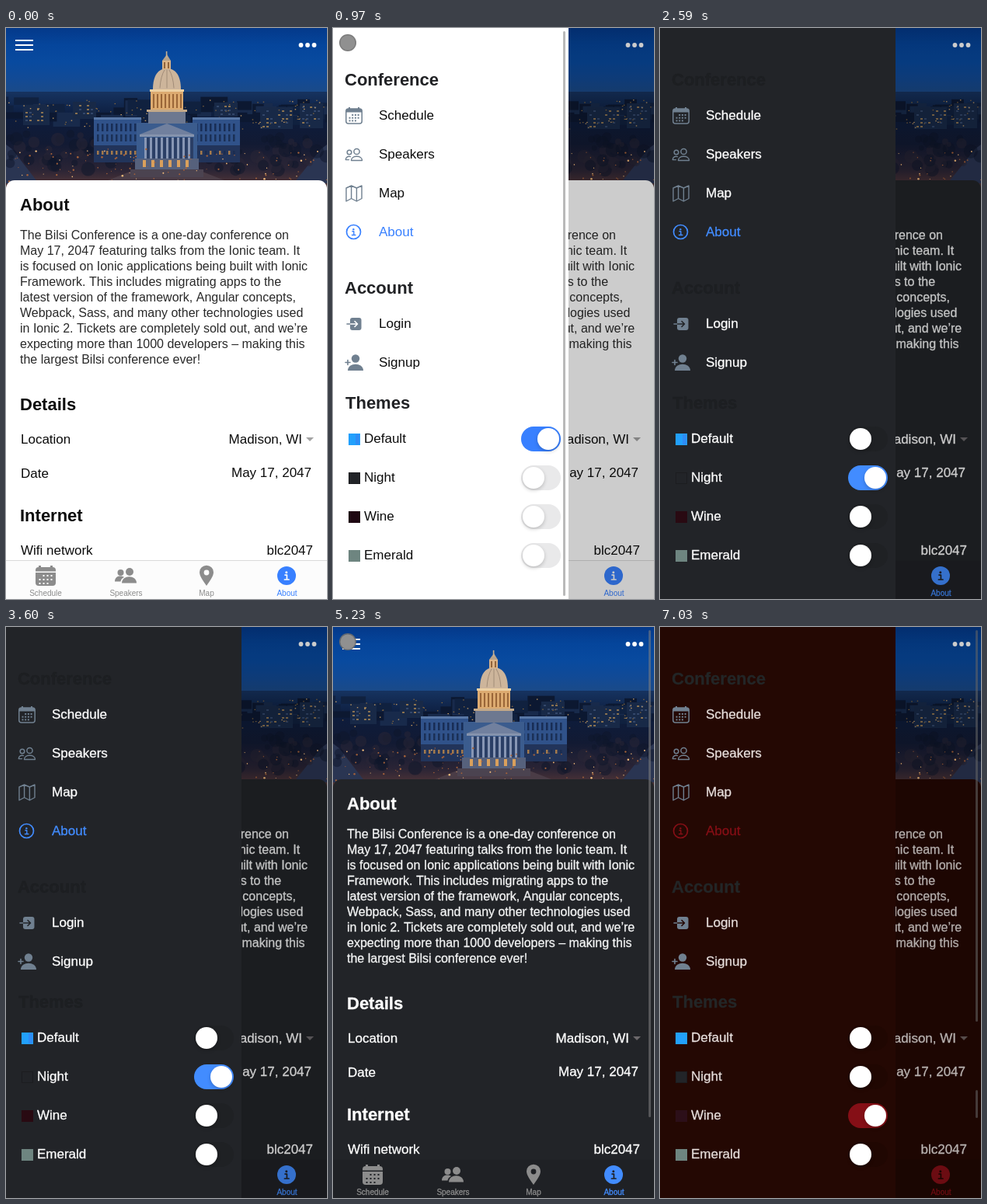
An HTML page with a canvas for the animation above (8000 ms loop, 413 by 735 pixels).

```html
<!DOCTYPE html>
<html lang="en">
<head>
<meta charset="utf-8">
<title>Conference app themes</title>
<style>
html, body { margin: 0; width: 100%; height: 100%; overflow: hidden; background: #fff; }
canvas { display: block; width: 413px; height: 735px; }
</style>
</head>
<body>
<canvas id="stage" width="413" height="735"></canvas>
<script>
const W = 413, H = 735, LOOP = 8000, MENU = 303;
const ctx = document.getElementById('stage').getContext('2d');
const FONT = '"Liberation Sans", Arial, sans-serif';

const THEMES = [
  { bg: '#ffffff', text: '#0c0c0c', body: '#2a2a2a', head: '#212225', accent: '#3880ff', off: '#e9e9ea',
    tab: '#fcfcfc', line: '#dadada', caret: '#a3a3a3', plum: '#1f0812', edge: '#2f8cf6' },
  { bg: '#222428', text: '#ffffff', body: '#f4f5f5', head: '#1d1f22', accent: '#428cff', off: '#1f2124',
    tab: '#1f2125', line: '#212327', caret: '#6c686b', plum: '#290a12', edge: '#2f8cf6' },
  { bg: '#240803', text: '#e6dedc', body: '#e0d8d6', head: '#232627', accent: '#850f16', off: '#200702',
    tab: '#200702', line: '#220702', caret: '#6c5f5e', plum: '#2c0f19', edge: '#22a0fc' }
];
const SLATE = '#708090', GREY = '#8c8c8c', SCROLL = 'rgba(128,128,128,.55)';

const clamp = v => Math.min(1, Math.max(0, v));
const ramp = (t, from, len) => clamp((t - from) / len);
const smooth = v => v * v * (3 - 2 * v);

function bezier(x1, y1, x2, y2) {
  const at = (a, b, s) => 3 * (1 - s) * (1 - s) * s * a + 3 * (1 - s) * s * s * b + s * s * s;
  return x => {
    let lo = 0, hi = 1;
    for (let i = 0; i < 24; i++) {
      const mid = (lo + hi) / 2;
      if (at(x1, x2, mid) < x) lo = mid; else hi = mid;
    }
    return x <= 0 ? 0 : x >= 1 ? 1 : at(y1, y2, lo);
  };
}
const easeOpen = bezier(.32, .72, 0, 1);
const easeClose = bezier(1, 0, .68, .28);

function mix(a, b, k) {
  const part = (c, i) => parseInt(c.slice(i, i + 2), 16);
  return 'rgb(' + [1, 3, 5].map(i => Math.round(part(a, i) + (part(b, i) - part(a, i)) * k)) + ')';
}
function blend(a, b, k) {
  const out = {};
  for (const key in a) out[key] = mix(a[key], b[key], k);
  return out;
}

// ---- drawing helpers ----
let ink = 0; // extra stem weight for light text on dark

// Words are set one by one, so no kerning happens across spaces.
function text(c, s, x, y, size, color, bold, align) {
  c.font = (bold ? 'bold ' : '') + size + 'px ' + FONT;
  c.fillStyle = c.strokeStyle = color;
  c.lineWidth = ink;
  const gap = c.measureText(' ').width;
  const words = s.split(' ').map(w => [w, c.measureText(w).width]);
  const width = words.reduce((sum, w) => sum + w[1] + gap, -gap);
  if (align === 'right') x -= width;
  if (align === 'center') x -= width / 2;
  for (const [w, len] of words) {
    c.fillText(w, x, y);
    if (ink > 0) c.strokeText(w, x, y);
    x += len + gap;
  }
}
function rect(c, x, y, w, h, color) {
  c.fillStyle = color;
  c.fillRect(x, y, w, h);
}
function box(c, x, y, w, h, r, color) {
  c.fillStyle = color;
  c.beginPath();
  c.roundRect(x, y, w, h, r);
  c.fill();
}
function disc(c, x, y, r, color) {
  c.fillStyle = color;
  c.beginPath();
  c.arc(x, y, r, 0, 7);
  c.fill();
}
function poly(c, pts, color) {
  c.fillStyle = color;
  c.beginPath();
  pts.forEach(p => c.lineTo(p[0], p[1]));
  c.fill();
}
function stroke(c, path, color, width) {
  c.strokeStyle = color;
  c.lineWidth = width;
  c.lineCap = c.lineJoin = 'round';
  c.stroke(new Path2D(path));
}
const fillPath = (c, path, color) => { c.fillStyle = color; c.fill(new Path2D(path)); };

// ---- hero picture: simple night skyline ----
const hero = document.createElement('canvas');
hero.width = W;
hero.height = 216;
function paintHero(c) {
  let seed = 11;
  const rnd = (a, b) => {
    seed = (seed * 16807) % 2147483647;
    return a + (b - a) * seed / 2147483647;
  };
  const fade = (y0, y1, stops) => {
    const g = c.createLinearGradient(0, y0, 0, y1);
    stops.forEach((s, i) => g.addColorStop(i / (stops.length - 1), s));
    return g;
  };
  rect(c, 0, 0, W, 86, fade(0, 86, ['#04398a', '#05459b', '#084a9f', '#114a96', '#1d4a85']));
  rect(c, 0, 82, W, 134, fade(82, 216, ['#163360', '#0d1c3c', '#121a33', '#2a2435', '#6a4038']));

  for (let i = 0; i < 46; i++) {
    const x = rnd(-10, W), y = rnd(88, 114), w = rnd(12, 36);
    rect(c, x, y, w, rnd(8, 22), ['#10213f', '#0c1831', '#182a4b'][i % 3]);
  }
  for (const [x, y, w, h] of [[22, 99, 34, 26], [86, 95, 30, 22], [268, 96, 30, 18], [327, 102, 42, 28], [378, 97, 30, 32]]) {
    rect(c, x, y, w, h, '#182947');
    for (let j = y + 4; j < y + h - 3; j += 5)
      for (let i = x + 3; i < x + w - 3; i += 5)
        if (rnd(0, 1) > .5) rect(c, i, j, 3, 2, rnd(0, 1) > .6 ? '#8a7250' : '#33476a');
  }
  for (let i = 0; i < 110; i++)
    rect(c, rnd(0, W), rnd(92, 130), 1.5, 1.2, i % 3 ? '#87693f' : '#d0a468');

  poly(c, [[0, 150], [8, 156], [42, 200], [0, 200]], '#2a3552');
  poly(c, [[413, 150], [405, 156], [370, 200], [413, 200]], '#2a3552');
  poly(c, [[80, 216], [172, 180], [240, 180], [332, 216]], '#4a3c46');

  for (let i = 0; i < 90; i++) {
    const x = i % 2 ? rnd(0, 158) : rnd(256, W);
    c.globalAlpha = .5;
    disc(c, x, rnd(134, 184), rnd(3, 9), i % 3 ? '#0d162a' : '#2a2536');
  }
  c.globalAlpha = 1;

  // wings
  for (const x of [113, 240]) {
    rect(c, x, 117, 61, 37, '#30528a');
    rect(c, x, 115, 61, 3, '#5877a6');
    rect(c, x, 151, 61, 22, '#22345a');
    for (let i = x + 4; i < x + 58; i += 6) {
      rect(c, i, 123, 2.5, 10, '#182d55');
      rect(c, i, 137, 2.5, 9, '#1b3056');
      rect(c, i, 158, 2.5, 5, i % 4 ? '#a47a4c' : '#1b2c50');
    }
  }
  // centre block
  rect(c, 168, 122, 78, 60, '#3b5c8e');
  poly(c, [[172, 137], [207, 123], [242, 137]], '#71809e');
  rect(c, 172, 137, 70, 3, '#8593ad');
  for (let i = 178; i < 240; i += 7) {
    rect(c, i, 141, 3, 27, '#8796b4');
    rect(c, i + 3, 141, 4, 27, '#2b3f66');
  }
  rect(c, 166, 168, 82, 14, '#56617c');
  for (let i = 176; i < 242; i += 11) rect(c, i, 170, 4, 9, '#d9a05c');
  rect(c, 160, 182, 94, 10, '#4b4350');

  // dome
  rect(c, 183, 107, 48, 16, '#6d7890');
  rect(c, 181, 105, 52, 3, '#c4a988');
  rect(c, 186, 80, 42, 25, '#dcaa70');
  for (let i = 189; i < 227; i += 5) rect(c, i, 85, 2, 18, '#9a6638');
  rect(c, 185, 79, 44, 3, '#ecd0a4');
  fillPath(c, 'M189 79C189 61 196 52 207 52S225 61 225 79Z', '#cdb59b');
  stroke(c, 'M198 77Q199 62 204 54M216 77Q215 62 210 54M207 77V54', '#a18c78', 1);
  rect(c, 201, 42, 11, 11, '#dcb488');
  rect(c, 203, 44, 2, 8, '#93653c');
  rect(c, 208, 44, 2, 8, '#93653c');
  poly(c, [[201, 42], [207, 34], [212, 42]], '#b5a28c');
  rect(c, 205.8, 30, 1.6, 8, '#c6b193');

  for (let i = 0; i < 110; i++) {
    const y = rnd(156, 200);
    disc(c, rnd(0, W), y, rnd(.5, 1.3), i % 4 ? '#a5623a' : '#f4bd7c');
  }
}
paintHero(hero.getContext('2d'));

// ---- icons ----
function people(c, x, y, color) {
  disc(c, x + 19, y + 5.5, 5, color);
  fillPath(c, `M${x + 9} ${y + 20}C${x + 9} ${y + 9} ${x + 28} ${y + 9} ${x + 28} ${y + 20}Z`, color);
  disc(c, x + 7.5, y + 6.5, 4, color);
  fillPath(c, `M${x} ${y + 18}C${x} ${y + 10} ${x + 9} ${y + 10} ${x + 12} ${y + 12.5}Q${x + 8} ${y + 14} ${x + 7.5} ${y + 18}Z`, color);
}
function dayDots(c, x, y, step, size, color) {
  for (let r = 0; r < 3; r++)
    for (let i = 0; i < 4; i++)
      if (!(r === 0 && i === 0) && !(r === 2 && i === 3)) rect(c, x + i * step, y + r * step, size, size, color);
}
function letterI(c, x, y, k, color) {
  disc(c, x - .2 * k, y - 4.2 * k, 1.5 * k, color);
  stroke(c, `M${x - 2 * k} ${y - .9 * k}H${x + .4 * k}V${y + 5 * k}M${x - 2.6 * k} ${y + 5 * k}H${x + 3 * k}`, color, 1.7 * k);
}
function tabBar(c, th) {
  rect(c, 0, 685, W, 50, th.tab);
  rect(c, 0, 685, W, 1, th.line);
  box(c, 38, 694, 26, 24, 4, GREY);
  rect(c, 42, 692, 3, 4, GREY);
  rect(c, 57, 692, 3, 4, GREY);
  rect(c, 38, 699.5, 26, 1.5, th.tab);
  dayDots(c, 42.5, 704, 5, 2, th.tab);
  people(c, 140, 694.5, GREY);
  fillPath(c, 'M258 718C254 712 249 706 249 700.5A9 8.7 0 0 1 267 700.5C267 706 262 712 258 718Z', GREY);
  disc(c, 258, 701, 3.4, th.tab);
  disc(c, 361, 705, 12, th.accent);
  letterI(c, 361, 705, 1, th.tab);
  ['Schedule', 'Speakers', 'Map', 'About'].forEach((s, i) =>
    text(c, s, [51, 154.5, 258, 361.5][i], 731, 10, i === 3 ? th.accent : GREY, false, 'center'));
}

// ---- page ----
const COPY = [
  'The Bilsi Conference is a one-day conference on',
  'May 17, 2047 featuring talks from the Ionic team. It',
  'is focused on Ionic applications being built with Ionic',
  'Framework. This includes migrating apps to the',
  'latest version of the framework, Angular concepts,',
  'Webpack, Sass, and many other technologies used',
  'in Ionic 2. Tickets are completely sold out, and we’re',
  'expecting more than 1000 developers – making this',
  'the largest Bilsi conference ever!'
];
function page(c, th, t) {
  rect(c, 0, 0, W, H, th.bg);
  c.drawImage(hero, 0, 0);
  box(c, 0, 196, W, 560, 11, th.bg);
  for (const y of [16, 22, 28]) rect(c, 12, y - 1, 23, 2, '#fff');
  for (const x of [379.5, 388, 396.5]) disc(c, x, 22, 2.9, '#fff');

  text(c, 'About', 18, 235, 22, th.text, true);
  COPY.forEach((s, i) => text(c, s, 18, 272 + 20 * i, 16, th.body));
  text(c, 'Details', 18, 492, 22, th.text, true);
  text(c, 'Location', 19, 535, 17, th.text);
  text(c, 'Madison, WI', 381, 535, 17, th.text, false, 'right');
  poly(c, [[386, 527], [396, 527], [391, 532]], th.caret);
  text(c, 'Date', 19, 579, 17, th.text);
  text(c, 'May 17, 2047', 393, 578, 17, th.text, false, 'right');
  text(c, 'Internet', 18, 635, 22, th.text, true);
  text(c, 'Wifi network', 19, 678, 17, th.text);
  text(c, 'blc2047', 395, 678, 17, th.text, false, 'right');
  tabBar(c, th);

  if (t >= 3900) {
    const split = t >= 5250;
    box(c, 406, 4, 3, split ? 504 : 627, 1.5, SCROLL);
    if (split) box(c, 406, 596, 3, 36, 1.5, SCROLL);
  }
}

// ---- side menu ----
function menuIcons(c, th) {
  c.strokeStyle = SLATE;
  c.lineWidth = 1.5;
  c.beginPath();
  c.roundRect(16.8, 104, 20.4, 19, 3);
  c.stroke();
  rect(c, 17, 104, 20, 4.5, SLATE);
  rect(c, 20, 102, 2, 3, SLATE);
  rect(c, 32, 102, 2, 3, SLATE);
  dayDots(c, 20.5, 111, 3.7, 2, SLATE);

  c.beginPath();
  c.arc(30.5, 159, 3.6, 0, 7);
  c.stroke();
  c.beginPath();
  c.arc(21, 160, 2.8, 0, 7);
  c.stroke();
  stroke(c, 'M23.5 170.5C23.5 163.5 37.5 163.5 37.5 170.5ZM22.5 165.6C19.5 164.6 16.5 166 16.3 169.6H20.5', SLATE, 1.4);
  stroke(c, 'M17 206L23.6 203L30.4 206L37 203V219.5L30.4 223L23.6 219.5L17 223ZM23.6 203V219.5M30.4 206V223', SLATE, 1.4);

  c.strokeStyle = th.accent;
  c.lineWidth = 1.7;
  c.beginPath();
  c.arc(26.5, 262.5, 9, 0, 7);
  c.stroke();
  letterI(c, 26.5, 262.5, .8, th.accent);

  box(c, 22, 373, 14.5, 16, 3, SLATE);
  stroke(c, 'M22 381H31M28 377.5L31.5 381L28 384.5', th.bg, 1.6);
  stroke(c, 'M18 381H21.5', SLATE, 1.6);

  disc(c, 29, 425.5, 5.2, SLATE);
  fillPath(c, 'M19 441C19 430 39 430 39 441Z', SLATE);
  stroke(c, 'M19 427.5V433.5M16 430.5H22', SLATE, 1.6);
}
function toggle(c, y, on, th) {
  box(c, 242, y - 16, 51, 32, 16, th.off);
  c.globalAlpha = on;
  box(c, 242, y - 16, 51, 32, 16, th.accent);
  c.globalAlpha = 1;
  c.save();
  c.shadowColor = 'rgba(0,0,0,.2)';
  c.shadowBlur = 5;
  c.shadowOffsetY = 2;
  disc(c, 258 + 19 * on, y, 14, '#fff');
  c.restore();
}
function menu(c, th, shown, on, barOn) {
  if (shown <= 0) return;
  c.save();
  c.translate(-MENU * (1 - shown), 0);
  rect(c, 0, 0, MENU, H, th.bg);
  text(c, 'Conference', 15, 74, 22, th.head, true);
  text(c, 'Account', 15, 342, 22, th.head, true);
  text(c, 'Themes', 16, 490, 22, th.head, true);
  [['Schedule', 118], ['Speakers', 168], ['Map', 218], ['About', 268], ['Login', 386], ['Signup', 436]]
    .forEach(([s, y]) => text(c, s, 59, y, 17, s === 'About' ? th.accent : th.text));
  menuIcons(c, th);

  const fills = ['#22a0fc', '#222428', th.plum, '#6e8580'];
  ['Default', 'Night', 'Wine', 'Emerald'].forEach((s, i) => {
    const y = 529 + 50 * i;
    rect(c, 20, y - 7, 15, 15, i === 1 ? '#1c1d20' : fills[i]);
    if (i === 1) rect(c, 21, y - 6, 13, 13, fills[i]);
    if (i === 0) rect(c, 29, y - 6, 5, 13, th.edge);
    text(c, s, 40, y + 5, 17, th.text);
    toggle(c, y, on[i], th);
  });
  if (barOn) box(c, 296, 4, 3, 727, 1.5, SCROLL);
  c.restore();
}

// ---- timeline ----
const TOUCHES = [[500, 1130, 19, 19], [2140, 2560, 256.5, 583], [5230, 5630, 19, 19], [6720, 7000, 256.5, 633]];
const NIGHT = 2210, WINE = 6760;

function menuShown(t) {
  if (t < 3590) return easeOpen(ramp(t, 520, 400));
  if (t < 5250) return 1 - easeClose(ramp(t, 3590, 400));
  return easeOpen(ramp(t, 5250, 380));
}
function draw(t) {
  const dark = ramp(t, NIGHT, 200);
  const th = t < WINE
    ? blend(THEMES[0], THEMES[1], dark)
    : blend(THEMES[1], THEMES[2], ramp(t, WINE, 200));
  const a = smooth(ramp(t, NIGHT, 240)), b = smooth(ramp(t, WINE, 240));
  const shown = menuShown(t);
  ink = .3 * dark;

  page(ctx, th, t);
  rect(ctx, 0, 0, W, H, `rgba(0,0,0,${.2 * shown})`);
  menu(ctx, th, shown, [1 - a, a - b, b, 0], t < 1130 || (t >= 5230 && t < 5790));

  for (const [from, to, x, y] of TOUCHES) {
    if (t < from || t >= to) continue;
    disc(ctx, x, y, 11, 'rgba(110,110,110,.9)');
    disc(ctx, x, y, 9.5, '#909090');
  }
}

const start = performance.now();
function tick() {
  draw((performance.now() - start) % LOOP);
  requestAnimationFrame(tick);
}
tick();
</script>
</body>
</html>
```
